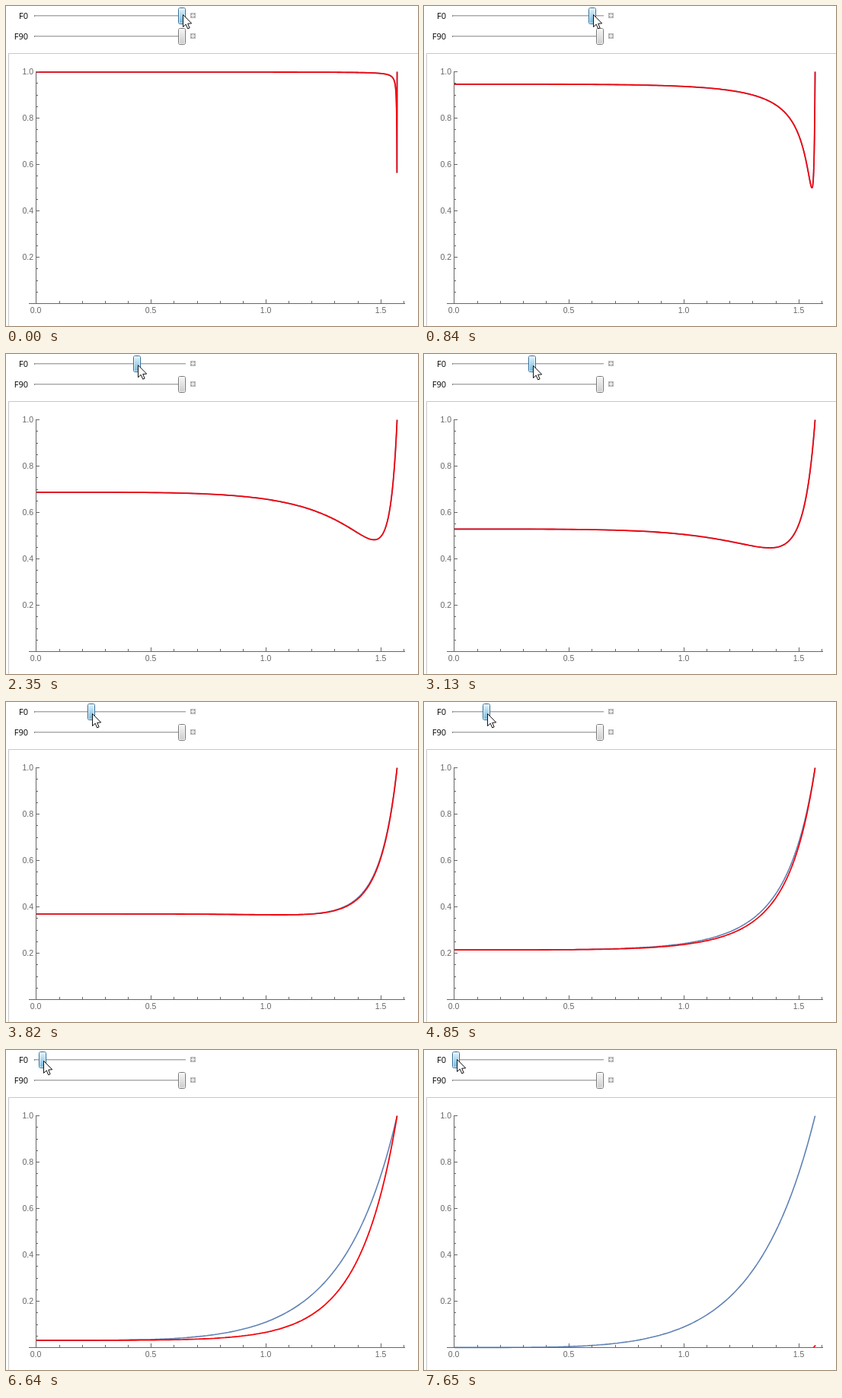
These frames come from a looping animation (541x421 px, 8000 ms). An HTML page with a canvas:

```html
<!DOCTYPE html>
<html>
<head>
<meta charset="utf-8">
<style>
  html, body { margin: 0; width: 100%; height: 100%; overflow: hidden; background: #fff; }
  canvas { display: block; }
</style>
</head>
<body>
<canvas id="stage" width="541" height="421"></canvas>
<script>
const ctx = document.getElementById('stage').getContext('2d');
const LOOP = 8000;
const STEP = 73.5;               // time between redraws
const START = 216.5;             // the drag begins
const END = START + 101 * STEP;  // the slider reaches zero
const HALF_PI = Math.PI / 2;
const RED = '#f2050c', BLUE = '#5e81b5', GRAY = '#666';

// Time and F0 where the drag changes speed; after these it slows to a stop.
const DRAG = [
  [START, 0.999], [1470, 0.887], [2350, 0.687], [3820, 0.369],
  [4450, 0.243], [4850, 0.214], [5310, 0.131], [5880, 0.0735]
];

function ease(from, to, t) {
  const u = Math.min(1, Math.max(0, (t - from) / (to - from)));
  return u * u * (3 - 2 * u);
}

function dragValue(t) {
  const i = DRAG.findIndex(key => key[0] > t);
  if (i < 0) {
    const [slowdown, value] = DRAG[DRAG.length - 1];
    return value * Math.pow(Math.max(0, (END - t) / (END - slowdown)), 1.6);
  }
  const [t0, a] = DRAG[i - 1], [t1, b] = DRAG[i];
  return a + (b - a) * (t - t0) / (t1 - t0);
}

const pointerHeight = t => 11.5 + 4 * ease(900, 2900, t) - 3 * ease(5900, 7600, t);
const plotX = x => 39.8 + x * 301.6;
const plotY = y => 391.4 - y * 304.8;

function reflectance(n, c, cosT) {
  const s = (c - n * cosT) / (c + n * cosT);
  const p = (n * c - cosT) / (n * c + cosT);
  return (s * s + p * p) / 2;
}
const exact = (n, c) => reflectance(n, c, Math.sqrt(1 - (1 - c * c) / (n * n)));
const simplified = (n, c) => reflectance(n, c, 1);

function strokeLine(color, width) {
  ctx.strokeStyle = color;
  ctx.lineWidth = width;
  ctx.lineJoin = 'bevel';
  ctx.stroke();
}

// Samples crowd towards grazing angles, where the curve is steep.
function curve(f, n, color, width) {
  const steps = 400, nearest = 0.00053;
  ctx.beginPath();
  for (let i = 0; i <= steps; i++) {
    const d = HALF_PI * Math.pow(nearest / HALF_PI, i / steps);
    ctx.lineTo(plotX(HALF_PI - d), plotY(f(n, Math.sin(d))));
  }
  ctx.lineTo(plotX(HALF_PI), plotY(1));
  strokeLine(color, width);
}

// With equal media only the end of the exact curve leaves the axis.
function grazingMark() {
  ctx.beginPath();
  ctx.moveTo(plotX(HALF_PI) - 2, 391.5);
  ctx.lineTo(plotX(HALF_PI) + 0.5, 388.5);
  strokeLine(RED, 1.8);
}

function rect(x, y, w, h, color) {
  ctx.fillStyle = color;
  ctx.fillRect(x, y, w, h);
}

function label(text, x, y, font, color, align) {
  ctx.font = font;
  ctx.fillStyle = color;
  ctx.textAlign = align;
  ctx.fillText(text, x, y);
}

function axes() {
  const font = '10.5px "Liberation Sans", Arial, sans-serif';
  rect(30, 391, 494, 1, GRAY);
  rect(39, 86, 1, 306, GRAY);
  for (let i = 0; i <= 16; i++) {
    const major = i % 5 === 0, h = major ? 5 : 3;
    const x = Math.floor(plotX(i / 10) + 0.1);
    rect(x, 391 - h, 1, h, GRAY);
    if (major) label((i / 10).toFixed(1), x, 404, font, GRAY, 'center');
  }
  for (let i = 1; i <= 20; i++) {
    const major = i % 4 === 0;
    const y = Math.floor(plotY(i / 20) + 0.1);
    rect(40, y, major ? 4 : 2, 1, GRAY);
    if (major) label((i / 20).toFixed(1), 36, y + 3.5, font, GRAY, 'right');
  }
}

function slider(name, y, thumbX, light, dark, border) {
  label(name, 29, y + 4, '11px "Open Sans", "Noto Sans", sans-serif', '#000', 'right');
  rect(37, y - 1, 199, 1, '#a8a8a8');
  rect(37, y, 199, 1, '#d8d8d8');
  rect(37, y - 1, 1, 2, '#888');

  rect(242, y - 4, 7, 7, '#b4b4b4');
  rect(245, y - 3, 1, 5, '#fff');
  rect(243, y - 1, 5, 1, '#fff');

  const top = y - 11;
  const fill = ctx.createLinearGradient(0, top, 0, top + 22);
  fill.addColorStop(0, light);
  fill.addColorStop(1, dark);
  ctx.beginPath();
  ctx.roundRect(thumbX - 4.5, top + 0.5, 9, 21, 2);
  ctx.fillStyle = fill;
  ctx.fill();
  strokeLine(border, 1);
  ctx.strokeStyle = 'rgba(255,255,255,.7)';
  ctx.strokeRect(thumbX - 3.5, top + 1.5, 7, 19);
}

function pointer(x, y) {
  const outline = [[0, 0], [0, 16], [3.7, 12.6], [6.2, 18.4], [8.6, 17.4], [6.2, 11.7], [11.2, 11.4]];
  ctx.beginPath();
  outline.forEach(([dx, dy]) => ctx.lineTo(x + dx, y + dy));
  ctx.closePath();
  ctx.fillStyle = '#fff';
  ctx.fill();
  strokeLine('#111', 1);
}

function draw(time) {
  const t = START + STEP * Math.min(101, Math.max(0, Math.floor((time - START) / STEP)));
  const f0 = dragValue(t);
  const root = Math.sqrt(f0);
  const n = (1 + root) / (1 - root);
  const thumbX = Math.round(42 + 189 * f0);

  rect(0, 0, 541, 421, '#fff');
  rect(3, 62, 538, 1, '#c8c8c8');
  rect(3, 62, 1, 359, '#c8c8c8');

  curve(simplified, n, BLUE, 1.6);
  if (f0 > 0) curve(exact, n, RED, 1.8);
  axes();
  if (f0 === 0) grazingMark();

  slider('F0', 13, thumbX, '#eaf6fd', '#68b3db', '#2f6c96');
  slider('F90', 40, 231, '#f8f8f8', '#cacaca', '#767676');
  pointer(thumbX + 1.5, pointerHeight(t));
}

function tick() {
  draw(performance.now() % LOOP);
  requestAnimationFrame(tick);
}
tick();
</script>
</body>
</html>
```
